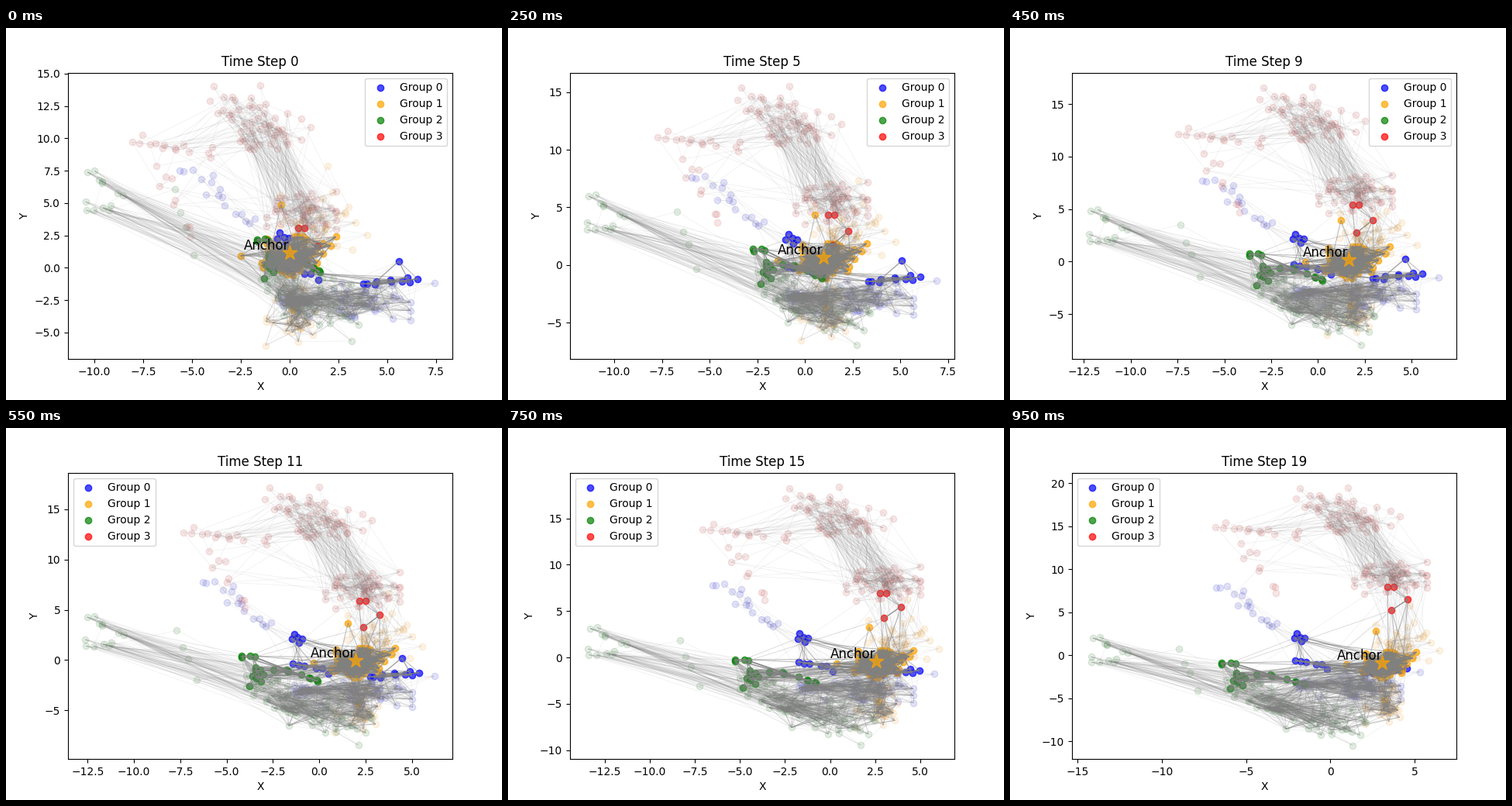
Recreate the animation shown at these times as a matplotlib script. Size 640 by 480 pixels, loop 1 s.

```python
import numpy as np
import matplotlib.pyplot as plt
from matplotlib.animation import FuncAnimation
from matplotlib.collections import LineCollection

FRAMES = 20
rng = np.random.default_rng(11)
BLUE, ORANGE, GREEN, RED = range(4)
COLORS = ["blue", "orange", "green", "red"]
FAINT_COLORS = ["#2020d0", "#f0a030", "#207020", "#c04040"]
HUB = (.2, -2.5)

start, end, accel, groups, solid = [], [], [], [], []


def cloud(n, center, spread):
    """Soft blob of n points around a center."""
    return center + np.clip(rng.normal(size=(n, 2)), -2, 2) * spread


def strip(n, a, b, jitter=.3):
    """n points strewn along the way from a to b."""
    u = np.linspace(0, 1, n)[:, None]
    return np.array(a) * (1 - u) + np.array(b) * u + rng.normal(0, jitter, (n, 2))


def add(group, is_solid, drift, *parts):
    """Add nodes that a scale and a shift carry to their end pose."""
    scale, shift, curve = drift
    pts = np.vstack(parts)
    start.extend(pts)
    end.extend(pts * scale + shift)
    accel.extend([curve] * len(pts))
    groups.extend([group] * len(pts))
    solid.extend([is_solid] * len(pts))


blue_drift = (.924, 1.13), (-1.55, -.57), 0
orange_drift = (.85, 1), (3.08, -2.03), -.23
inner_drift = (1.54, 1), (-3.94, -3.1), .22
green_drift = (1.14, .957), (-2.3, -5.08), 0
red_drift = (1.2, 1.05), (2.85, 4.7), 0

add(BLUE, True, blue_drift,
    cloud(5, (-.5, 2.4), (.4, .25)),
    strip(6, (-.8, 0), (1.6, -.7), .15),
    strip(10, (3.9, -1.1), (6.5, -.9), .2), [(5.6, .5)])
add(BLUE, False, blue_drift,
    strip(16, (-5.4, 8.1), (-2, 3.2), .4), [(7.44, -1.2)],
    cloud(45, (3.6, -2.7), (1.3, .75)), cloud(16, HUB, (.5, .5)))

add(ORANGE, True, orange_drift,
    cloud(65, (.1, .9), (.8, .75)), strip(3, (2, 1.1), (2.4, 2.2), .1),
    [(-2.5, .93), (-.44, 4.87), (.16, -3.2)])
add(ORANGE, False, orange_drift,
    cloud(22, (.2, -4.5), (.7, .6)), cloud(35, (1.3, 3.6), (1.2, 1.1)),
    cloud(14, HUB, (.5, .6)), [(3.97, 2.55), (1.95, 7.85), (-1.23, -6)])

add(GREEN, True, inner_drift,
    cloud(14, (-1.15, 1.1), (.4, .95)), strip(8, (-.1, 1), (1.8, -.6), .2))
add(GREEN, False, inner_drift,
    cloud(24, (-.5, -.4), (.7, 1)), cloud(16, HUB, (.4, .5)))
add(GREEN, False, green_drift,
    strip(6, (-10.3, 7.3), (-8.8, 5.6), .15),
    strip(5, (-10.4, 4.3), (-9, 4.7), .1),
    strip(4, (-5.6, 6), (-4.6, 1), .3),
    cloud(34, (1.8, -2.6), (1.2, .9)),
    [(-10.45, 5.1), (-10, 7.5), (3.18, -5.66)])

add(RED, True, red_drift, [(.45, 3.1), (.75, 3.1), (1.45, 1.7), (.65, .5)])
add(RED, False, red_drift,
    strip(13, (-7.9, 9.7), (-4, 8.9), .25),
    strip(9, (-7, 7.6), (-5, 2.6), .4),
    cloud(18, (-2.2, 12.4), (1.3, .6)), cloud(32, (-1.2, 10.4), (.9, .6)),
    cloud(50, (.6, 4.3), (.9, 1)),
    [(-8.06, 9.7), (-3.9, 14), (-1.5, 14.1), (1.07, 10.87)])

start, end, accel, groups, solid = map(
    np.array, (start, end, accel, groups, solid))


def link(mask, count, reach):
    """Random pairs, preferring nodes that begin close together."""
    pairs = rng.choice(np.flatnonzero(mask), (count * 30, 2))
    gap = np.linalg.norm(start[pairs[:, 0]] - start[pairs[:, 1]], axis=1)
    keep = (gap > 0) & (rng.random(len(gap)) < np.exp(-gap / reach))
    return pairs[keep][:count]


def bridge(mask_a, mask_b, count):
    """Random pairs from one set of nodes to another."""
    return np.column_stack([rng.choice(np.flatnonzero(m), count)
                            for m in (mask_a, mask_b)])


x, y = start.T
low = ~solid & (y < -1)
strong = np.vstack([
    link(solid & (groups == BLUE), 70, 1.5),
    link(solid & (groups == ORANGE), 700, 1.3),
    link(solid & (groups == GREEN), 90, 1.2),
    link(solid & (groups == RED), 6, 2),
    link(solid, 90, .6)])
medium = np.vstack([
    link(low & (groups == BLUE), 260, 1.5),
    link(low & (groups == ORANGE), 120, .9),
    link(low & (groups == GREEN), 130, 1.2),
    link(low, 160, .8),
    link(solid | low, 120, .8)])
weak = np.vstack(
    [link(groups == g, 420, 2) for g in range(4)]
    + [link(~solid, 250, 1),
       bridge((groups == GREEN) & (x < -8), (groups == GREEN) & (x > -3), 130),
       bridge((groups == RED) & (y > 9) & (x > -3.5),
              (groups == RED) & (y < 6.5) & (x > -1.5), 130)])

fig, ax = plt.subplots(figsize=(6.4, 4.8), dpi=100)
ax.set_xlabel("X")
ax.set_ylabel("Y")
title = ax.set_title("")

dots = []
for is_solid in (False, True):
    for g in range(4):
        style = (dict(color=COLORS[g], alpha=.7, label=f"Group {g}")
                 if is_solid else dict(color=FAINT_COLORS[g], alpha=.13))
        dots.append((ax.scatter([], [], **style),
                     (groups == g) & (solid == is_solid)))

lines = []
for pairs, width, alpha in (weak, .5, .13), (medium, .6, .32), (strong, .8, .5):
    collection = LineCollection([], colors="gray", linewidths=width,
                                alpha=alpha, zorder=2)
    lines.append((ax.add_collection(collection), pairs))

star = ax.scatter([0], [0], s=200, marker="*", color="orange", alpha=.7,
                  zorder=3)
label = ax.text(0, 0, "Anchor", fontsize=12, ha="right", va="bottom", zorder=4)
legend = ax.legend(loc="upper right")


def progress(u, curve):
    return u + curve * (u * u - u)


def update(step):
    u = step / (FRAMES - 1)
    eased = np.column_stack([progress(u, accel), np.full(len(accel), u)])
    pos = start + (end - start) * eased
    for dot, mask in dots:
        dot.set_offsets(pos[mask])
    for line, pairs in lines:
        line.set_segments(pos[pairs])

    anchor = 3.08 * progress(u, -.23), 1.17 - 2.03 * u
    star.set_offsets([anchor])
    label.set_position(anchor)

    # The view follows the outermost nodes, which change on two sides.
    ax.set_xlim(-11.35 - .188 * step - .00116 * step ** 2,
                max(8.354 - .106 * step, 4.725 + .145 * step))
    ax.set_ylim(min(-7.05 - .15 * step, -6.77 - .28 * step),
                15.07 + .325 * step)
    title.set_text(f"Time Step {step}")
    legend.set_loc("upper right" if step < 10 else "upper left")


anim = FuncAnimation(fig, update, frames=FRAMES, interval=50, repeat=True,
                     repeat_delay=0, init_func=lambda: update(0))
plt.show()
```
